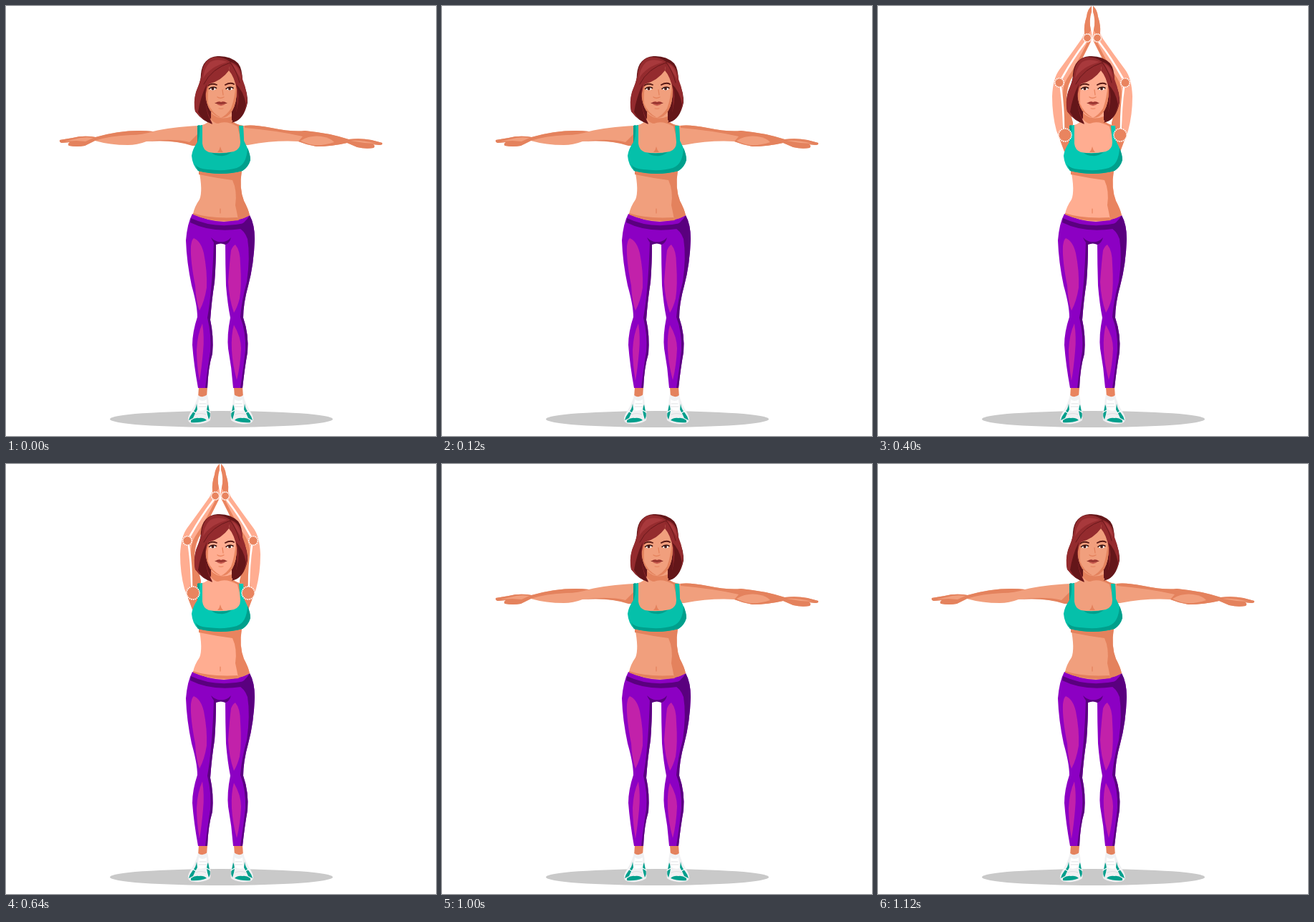
Recreate the animation shown at these times as an HTML page with a canvas. Size 600 by 600 pixels, loop 1200 ms.

```html
<!DOCTYPE html>
<html lang="en">
<head>
<meta charset="utf-8">
<title>Arm raise exercise</title>
<style>
html, body { margin: 0; width: 100%; height: 100%; overflow: hidden; background: #fff; }
canvas { display: block; width: 600px; height: 600px; }
</style>
</head>
<body>
<canvas id="stage" width="600" height="600"></canvas>
<script>
const ctx = document.getElementById('stage').getContext('2d');
const LOOP = 1200;
const PURPLE = '#8c00c3', PLUM = '#5a007f', PINK = '#c221aa';
const HAIR = '#942b2e', HAIR_DARK = '#641619', HAIR_LIGHT = '#a8393c';
const WARM = { skin: '#f19f7d', shade: '#e4825d', teal: '#05c0aa', tealDark: '#009f8c' };
const LIGHT = { skin: '#ffad91', shade: '#e9845f', teal: '#03c8b3', tealDark: '#009f8c' };
let tone = WARM;

const fill = (color, d) => { ctx.fillStyle = color; ctx.fill(new Path2D(d)); };

function line(color, width, d) {
  ctx.strokeStyle = color;
  ctx.lineWidth = width;
  ctx.lineCap = 'round';
  ctx.stroke(new Path2D(d));
}

function oval(color, x, y, rx, ry) {
  ctx.fillStyle = color;
  ctx.beginPath();
  ctx.ellipse(x, y, rx, ry, 0, 0, Math.PI * 2);
  ctx.fill();
}

// Draw a left-hand part, then its reflection; sum = left x + right x.
function both(sum, draw) {
  draw(false);
  ctx.save();
  ctx.transform(-1, 0, 0, 1, sum, 0);
  draw(true);
  ctx.restore();
}

function joint(x, y, r, n) {
  oval(tone.shade, x, y, r, r);
  for (let i = 0; i < n; i++) {
    const a = i / n * Math.PI * 2;
    oval('#fff', x + r * Math.cos(a), y + r * Math.sin(a), 0.95, 0.95);
  }
}

function armsWide() {
  const { skin, shade } = tone;
  fill(skin, 'M269 167Q230 169 205 175Q165 171 125 183Q108 180 93 184L75 187Q74 190 78 191L89 190Q85 193 88 195Q99 197 110 195L124 188Q145 194 170 194Q183 194 196 189Q233 186 260 194L269 194Z');
  fill(shade, 'M205 175Q168 171 125 183Q108 180 93 184L75 187Q74 190 78 191L89 190Q85 193 88 195Q99 197 110 195L124 188Q145 181 174 180Q190 180 205 175Z');
  fill(skin, 'M122 184Q108 182 95 186L82 189L98 188L111 189Z');
  fill(shade, 'M196 189Q233 184 256 190L268 178V195H260Q233 186 196 189Z');
  fill(skin, 'M331 167Q345 165 370 170Q400 176 417 174Q450 177 478 186Q495 184 510 187L525 191Q526 194 521 194L512 193Q516 195 513 198Q502 200 490 197L476 191Q455 196 433 196Q420 194 408 189Q375 187 338 194H331Z');
  fill(shade, 'M333 167Q345 165 370 170Q400 176 417 174Q450 177 478 186Q495 184 510 187L525 191Q526 194 521 194L512 193Q516 195 513 198Q502 200 490 197L476 191Q455 196 433 196Q420 194 408 189L414 182Q380 174 333 170Z');
  fill(skin, 'M411 188Q424 180 440 182Q453 184 458 190Q444 195 429 194Q418 192 411 188Z');
  fill(skin, 'M481 188Q495 187 517 192L500 191Z');
}

function hand(color, crease) {
  fill(color, 'M150 77Q147 68 147 65Q145 58 139 57Q136 59 140 66L140 70Q132 64 125 59Q119 57 120 61Q113 59 114 64Q111 68 117 73Q119 79 129 82L141 88Z');
  line(crease, 0.8, 'M120 61L131 70M114 64L126 72M117 73L128 76M140 70Q142 74 138 77');
}

function armsUp() {
  const { skin, shade } = tone;
  both(601, right => {
    fill(skin, 'M267 157Q239 129 207 109Q194 97 168 87L150 77L141 88Q151 105 166 117Q178 127 192 131Q217 151 239 179Q250 189 259 197L270 190Z');
    fill(shade, 'M267 157Q239 129 207 109Q194 97 168 87L150 77L147 82Q168 92 188 106Q198 113 204 121Q230 137 252 163L262 195L270 190Z');
    hand(right ? shade : skin, right ? skin : shade);
    line('#fff', 2.6, 'M150 88Q174 104 194 121');
    line('#fff', 2.6, 'M205 131Q227 147 250 166');
    joint(145, 82.5, 6, 15);
    joint(200, 126, 6.5, 15);
    joint(257, 173, 9.3, 21);
  });
}

function armsOver() {
  const { skin, shade } = tone;
  both(598, () => {
    fill(skin, 'M298 0Q292 5 291 15Q287 27 288 38L284 46Q270 66 253 89Q244 101 243 126Q243 152 249 174L260 203H272V163L263 128Q265 109 273 96Q286 72 297 50Q300 42 297 33Q294 20 298 7Z');
    fill(shade, 'M298 0Q292 5 291 15Q287 27 288 38L291 44L297 34Q294 20 298 8Z');
    fill(shade, 'M297 49Q286 72 273 96Q263 109 263 128L272 163V203H260L254 187Q260 160 258 125Q258 110 264 101Q277 82 292 51Z');
    line('#fff', 2.6, 'M289 51Q272 73 257 100');
    line('#fff', 2.6, 'M255 114Q259 142 259 170');
    joint(292, 44.5, 5.5, 14);
    joint(253, 107, 6.2, 15);
  });
}

function shoe() {
  fill(tone.shade, 'M269 532H281L280 546H268Z');
  fill('#f0f0f2', 'M268 543Q274 548 281 542Q283 550 283 558Q286 571 285 578Q280 582 271 583Q259 584 255 580Q252 575 258 566Q265 555 268 543Z');
  fill(tone.tealDark, 'M266 555Q265 563 260 568Q256 573 255 578L261 575Q264 568 267 563ZM282 556Q279 562 281 570L283 577Q286 572 284 566Z');
  line('#fff', 1.2, 'M260 565L265 568M280 564L285 567');
  fill('#fff', 'M269 549Q274 553 280 549L280 562Q275 566 267 564Z');
  fill(tone.tealDark, 'M258 578Q264 574 269 575Q276 574 280 578Q270 582 258 581Z');
  line('#d2d3d7', 0.7, 'M270 555H279M269 559H280M264 570Q272 567 279 570');
}

function legs() {
  both(599, shoe);
  fill(PURPLE, 'M260 290Q253 303 251 327Q252 357 259 390Q267 418 267 434Q260 455 260 473Q262 500 268 533H281Q282 505 288 485Q290 460 285 438Q287 410 291 385Q293 360 293 331H306Q306 360 307 390Q309 415 313 435Q308 460 310 478Q315 505 317 533H330Q333 505 337 483Q339 458 331 435Q331 415 338 390Q346 360 347 325Q347 305 340 292Q300 308 260 290Z');
  fill(PLUM, 'M293 331Q293 360 291 385Q287 410 285 438Q290 460 288 485Q282 505 281 533H278Q282 500 285 482Q287 460 281 435Q288 395 290 328Z');
  fill(PLUM, 'M340 292Q347 305 347 325Q346 360 338 390Q331 415 331 435Q339 458 337 483Q333 505 330 533H327Q332 500 334 480Q335 455 327 434Q329 410 336 385Q341 350 337 325Q333 313 322 308Q334 303 340 292Z');
  fill(PLUM, 'M258 296Q292 312 333 303L328 311Q287 317 257 302Z');
  fill(PLUM, 'M286 323Q293 330 300 329Q308 330 314 323Q312 331 306 333Q300 330 293 333Q289 330 286 323Z');
  fill(PINK, 'M262 324Q272 328 276 345Q281 370 280 393Q277 412 270 425Q265 412 264 390Q257 355 258 335Q259 326 262 324Z');
  fill(PINK, 'M274 443Q277 462 275 482Q273 505 270 523Q266 500 266 480Q267 458 274 443Z');
  fill(PINK, 'M320 333Q327 341 327 360Q329 390 326 408Q323 420 318 428Q311 408 310 385Q312 357 314 341Q317 334 320 333Z');
  fill(PINK, 'M318 445Q328 462 328 478Q327 502 322 522Q316 500 315 480Q314 458 318 445Z');
}

function torso() {
  const { skin, shade, teal, tealDark } = tone;
  fill(skin, 'M269 228Q275 258 270 270Q263 280 261 290Q280 300 304 301Q325 300 340 292Q338 283 332 272Q325 254 329 228Z');
  fill(shade, 'M269 230H329Q325 254 332 272Q338 283 340 292Q332 297 324 298Q322 287 320 278Q323 258 316 243Q293 240 269 235Z');
  fill(shade, 'M261 289Q284 297 323 295L325 299Q288 303 261 291Z');
  line(shade, 1.2, 'M299 283V289');

  fill(skin, 'M286 148Q289 161 274 166L268 168V208H331V167Q319 165 315 159V148Z');
  fill(shade, 'M286 149Q298 161 315 154V160Q321 166 331 167V194Q325 178 323 168Q307 159 296 164Q291 164 286 158Z');
  fill(shade, 'M295 204Q298 201 299 196Q300 201 303 204Z');

  fill(teal, 'M267 167L274 166V192Q275 201 283 204Q300 207 318 203Q327 200 327 190L325 167H331Q332 180 332 188Q341 205 341 215Q338 225 330 230Q300 238 268 230Q260 222 259 209Q260 200 267 190Z');
  fill(tealDark, 'M264 221Q268 227 281 228Q306 231 322 226Q336 221 337 198Q341 207 341 215Q338 225 330 230Q300 238 268 230Z');
  fill(tealDark, 'M287 205Q300 207 315 204Q307 210 299 209Q292 209 287 205Z');
  fill(tealDark, 'M267 167L270 166Q271 184 266 193L267 190Z');
}

function eye(x) {
  oval('#fff', x, 115.5, 4, 1.9);
  oval('#4b1d19', x, 115.4, 2, 2);
  line('#32100f', 1.6, `M${x - 5} 115.5Q${x} 111.5 ${x + 5} 114.5`);
}

function backHair() {
  fill(HAIR_DARK, 'M295 70Q274 72 272 95Q272 105 266 118Q261 132 264 147Q275 162 288 164Q302 166 318 162Q332 158 337 135Q338 122 330 105Q330 88 324 80Q313 69 295 70Z');
}

function head() {
  const { skin, shade } = tone;
  fill(skin, 'M279 108Q288 92 312 84Q323 98 322 117Q322 136 315 147Q307 156 300 156Q292 154 285 146Q279 137 278 119Z');
  fill(shade, 'M284 108Q281 120 282 136Q287 149 300 156Q292 154 285 146Q279 137 278 119L280 107Z');
  fill(shade, 'M321 108Q319 130 314 143Q308 152 300 156Q310 156 316 146Q322 135 322 117Z');

  eye(288.5);
  eye(312);
  line('#571713', 1.9, 'M282 111Q287 107 294 110M306 110Q313 106 318 109');
  line(shade, 1.3, 'M302 117L303 124M295 127Q299 130 304 127');
  fill('#a33a34', 'M292 135.5Q297 132 300 134Q304 132 308 135.5Q300 138 292 135.5Z');
  fill('#c5564c', 'M293 136Q300 138 307 136Q300 142.5 293 136Z');
  line('#7a211f', 0.8, 'M292 135.5Q300 137 308 135.5');
  line(shade, 1, 'M297 143Q300 144 303 143');

  // The swept fringe and side lock meet at a low parting.
  fill(HAIR, 'M313 78Q301 69 287 72Q274 78 273 97Q270 108 265 120Q261 135 264 147Q274 160 288 164Q281 151 279 137Q277 120 283 109Q301 104 311 90Z');
  fill(HAIR, 'M311 90L313 78Q328 82 330 102Q338 122 336 138Q332 153 318 161Q325 140 322 117Q319 99 311 90Z');
  fill(HAIR_DARK, 'M280 109Q277 122 279 137Q280 152 288 165Q274 160 268 148Q271 128 280 109Z');
  fill(HAIR_DARK, 'M321 109Q327 125 322 145Q319 156 315 163Q332 156 335 137Q331 118 321 109Z');
  fill(HAIR_LIGHT, 'M309 78Q294 72 284 79Q276 87 275 101Q284 85 309 78ZM316 81Q326 85 328 102Q321 92 316 81Z');
  line(HAIR_DARK, 0.9, 'M313 79Q287 87 276 109M313 79Q322 91 326 107');
}

const arms = [armsWide, armsUp, armsOver];

// Arms rest low, pass through the raised pose, hold overhead, and return.
function poseAt(t) {
  if (t < 200 || t >= 1000) return 0;
  return t < 400 || t >= 800 ? 1 : 2;
}

function draw(t) {
  const pose = poseAt(t);
  const shift = pose === 1 ? 0.7 : 0;
  tone = pose ? LIGHT : WARM;
  ctx.fillStyle = '#fff';
  ctx.fillRect(0, 0, 600, 600);
  oval('#c9c9c9', 300.5, 576.5, 155.5, 11.5);
  arms[pose]();
  ctx.save();
  ctx.translate(shift, 0);
  legs();
  backHair();
  torso();
  head();
  ctx.restore();
  if (pose === 2) both(599, () => joint(261, 180, 9, 21));
}

const start = performance.now();
function tick() {
  draw((performance.now() - start) % LOOP);
  requestAnimationFrame(tick);
}
tick();
</script>
</body>
</html>
```
